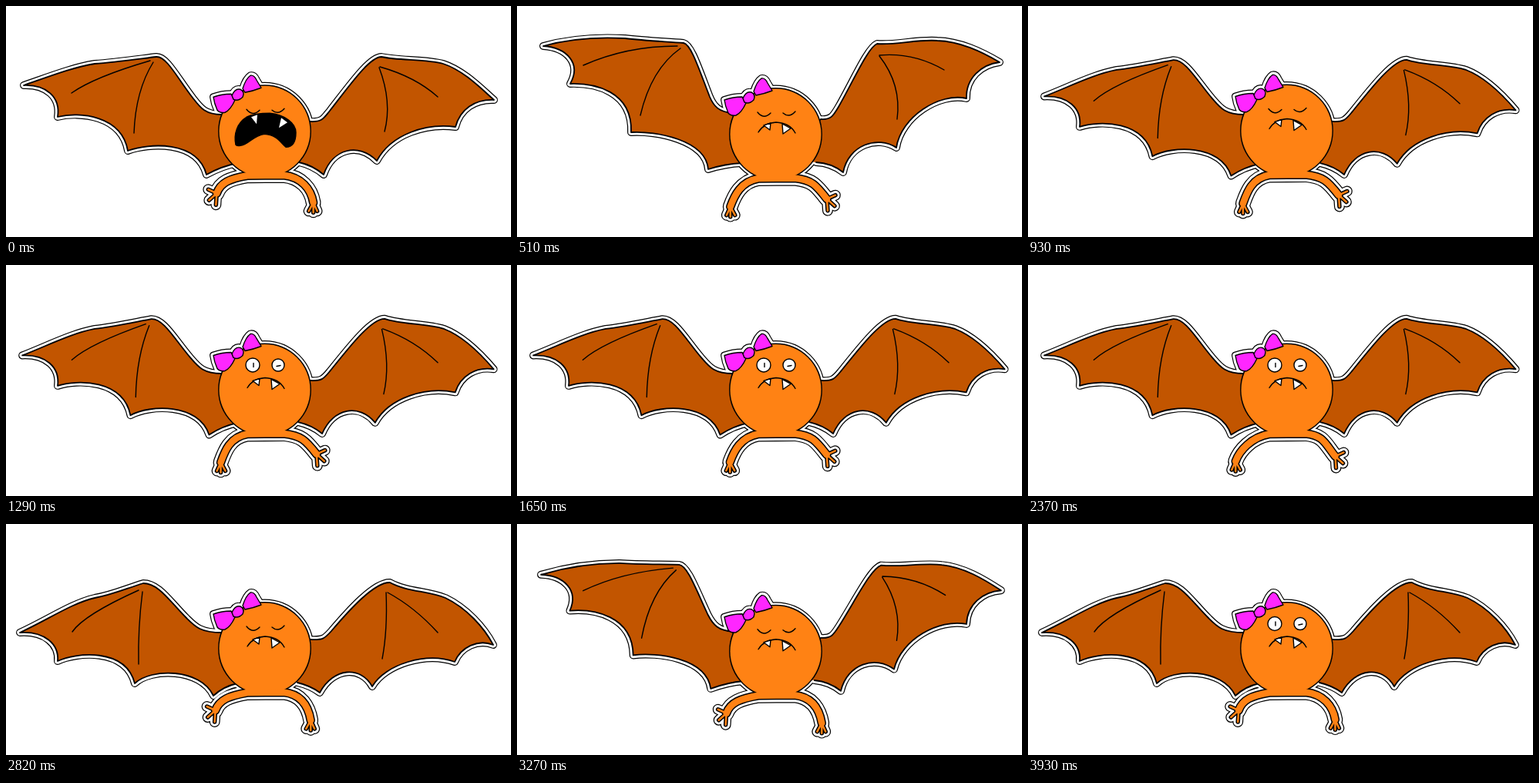
An HTML page with a canvas for the animation above (3.96 s loop, 655x300 px).

```html
<!DOCTYPE html>
<html>
<head>
<meta charset="utf-8">
<style>
html, body { margin: 0; width: 100%; height: 100%; overflow: hidden; background: #fff; }
canvas { display: block; }
</style>
</head>
<body>
<canvas width="655" height="300"></canvas>
<script>
const c = document.querySelector('canvas').getContext('2d');
c.lineJoin = c.lineCap = 'round';

const STEP = 30, STEPS = 132;
const SKIN = '#ff8214', WING = '#c25500', PINK = '#ff26ff';

// Wing height through one flap: 0 low, 1 middle, 2 high
const FLAP = [1, 1.73, 1.96, 2, 2, 2, 1.29, 0.62, 0.22, 0.05, 0, 0];

// Each part in its low, middle and high pose
const outlines = [
  [
    'M300 207L280 141C252 141 245 133 234 122C212 100 198 77 178 77C155 84 138 92 115 96C85 103 55 124 18 141C50 139 69 156 67 178C90 167 155 160 167 207C188 187 252 187 269 223Q282 211 300 207',
    'M300 204L280 141C258 141 252 132 242 119C222 93 208 65 195 66C170 69 140 73 115 75C85 80 55 92 23 103C52 102 71 118 67 144C95 137 150 142 158 188C185 178 248 174 260 219Q280 208 300 204',
    'M292 204L280 139C262 138 255 130 250 118C236 82 226 50 216 48C190 46 165 45 140 42C105 40 70 42 34 52C64 54 84 74 69 101C100 100 150 110 148 164C180 162 245 174 248 212Q270 205 292 204'
  ],
  [
    'M345 198L394 150C411 151 413 149 422 139C445 112 478 75 498 76C520 88 548 87 570 96C597 109 620 134 632 157C612 149 590 160 582 179C545 166 492 182 475 211C460 184 425 186 407 219Q395 210 378 206',
    'M345 198L394 150C410 151 412 146 420 136C448 100 472 66 487 66C510 71 545 69 567 75C592 83 614 105 633 122C608 121 589 134 583 157C545 152 500 166 481 201C457 177 424 185 412 219Q398 207 380 203',
    'M345 198L394 147C407 148 410 143 417 131C436 98 455 54 467 49C490 51 520 43 545 45C575 46 602 59 626 73C602 76 582 94 583 120C548 112 498 144 492 184C468 168 430 180 423 216Q408 204 388 203'
  ]
];
const veins = [
  [
    'M172 86Q101 118 86 140M177 88Q171 135 172 182',
    'M187 71Q115 92 85 113M191 73Q168 110 166 165',
    'M208 52Q142 52 86 77M212 55Q174 82 160 142'
  ],
  [
    'M495 89Q530 108 560 141M493 89Q495 138 488 175',
    'M485 79Q531 92 560 118M484 80Q501 125 491 163',
    'M470 64Q514 60 554 83M470 65Q499 102 493 147'
  ]
];

const bow = [
  'M269 117Q280 113 292 113L297 121Q291 134 284 137Q277 138 274 134Q270 125 269 117Z',
  'M307 106Q311 93 317 89Q322 88 325 95L331 105Q321 109 310 111Z',
  'M293 115Q297 105 304 107Q310 110 307 117Q301 123 295 120Z'
].map(d => new Path2D(d));
const head = new Path2D();
head.arc(335.5, 161.5, 59, 0, 7);

function blend(poses, v) {
  const i = v < 1 ? 0 : 1, next = poses[i + 1].match(/\d+/g);
  let n = 0;
  return new Path2D(poses[i].replace(/\d+/g, a => +a + (next[n++] - a) * (v - i)));
}

function line(p, width = 1.4, color = '#000') {
  c.lineWidth = width;
  c.strokeStyle = color;
  c.stroke(typeof p === 'string' ? new Path2D(p) : p);
}

function fill(p, color, width = 1.4) {
  const path = typeof p === 'string' ? new Path2D(p) : p;
  c.fillStyle = color;
  c.fill(path);
  if (width) line(path, width);
}

function eye(x, y, r) {
  const p = new Path2D();
  p.arc(x, y, r, 0, 7);
  fill(p, '#fff');
}

// Arms and fingers as centre lines; one hand is spread while the other hangs
function limbs(step) {
  const sway = Math.cos((step - 35) / STEPS * 2 * Math.PI);
  const rightOpen = step >= 9 && step < 94;
  const [lx, ly] = rightOpen ? [272.5 + 6.5 * sway, 255 + sway] : [273.5 + 2 * sway, 242];
  const [rx, ry] = rightOpen ? [400 + 3 * sway, 247 - 2 * sway] : [399 + 4 * sway, 254 - sway];
  const bend = rightOpen ? 14 : 3;
  const arms = new Path2D(`M${lx} ${ly}C${lx + 5} ${ly - 14} 290 223 313 219L360 218.5C383 221 ${rx - bend} ${ry - 18} ${rx} ${ry}`);
  const hang = [[-6, 11], [0, 13], [5, 11]];
  const spread = [[11, -5], [10, 9], [1, 15]];
  const fingers = new Path2D();
  const hand = (x, y, tips, side) => tips.forEach(([dx, dy]) => {
    fingers.moveTo(x, y);
    fingers.lineTo(x + dx * side, y + dy);
  });
  hand(lx, ly, rightOpen ? hang : spread, -1);
  hand(rx, ry, rightOpen ? spread : hang, 1);
  return [[arms, 11.5], [fingers, 5.5]];
}

function face(step) {
  const closed = step < 43 || (step >= 94 && step < 120);
  if (closed) {
    line('M312 133Q320 143 329 134M345 134Q353 141 361 132');
  } else {
    eye(320, 129.5, 9);
    eye(353, 129.5, 8);
    line('M321 127V132M351 131L356 130');
  }
  if (step < 8) {
    fill('M298 179C295 165 300 150 312 143Q322 138 342 138C362 140 376 151 376 163C376 176 372 182 363 182C356 176 351 166 335 165C320 167 314 180 304 180Q300 181 298 179Z', '#000');
    fill('M318 143L326 140L325 152Z', '#fff', 0);
    fill('M357 144L365 150L354 157Z', '#fff', 0);
  } else {
    line('M313 159Q320 147 336 146Q354 147 361 160');
    fill('M320 150L329 147L328 156Z', '#fff');
    fill('M344 148L355 154L345 161Z', '#fff');
  }
}

function draw(step) {
  const v = FLAP[step % 12], bob = 1.25 * v * v;
  const wings = outlines.map(o => blend(o, v));
  const tubes = limbs(step);
  const body = [[head, 1.5], ...bow.map(p => [p, 1.5]), ...tubes];
  const lowered = f => { c.save(); c.translate(0, bob); f(); c.restore(); };

  c.fillStyle = '#fff';
  c.fillRect(0, 0, 655, 300);
  // Black rim, then a white border inside it
  for (const [pad, color] of [[8.4, '#000'], [6, '#fff']]) {
    wings.forEach(w => line(w, 1.5 + pad, color));
    lowered(() => body.forEach(([p, w]) => line(p, w + pad, color)));
  }
  wings.forEach((w, i) => {
    fill(w, WING, 1.8);
    line(blend(veins[i], v));
  });
  lowered(() => {
    line(head, 2.8);
    tubes.forEach(([p, w]) => line(p, w));
    fill(head, SKIN, 0);
    tubes.forEach(([p, w]) => line(p, w - 3, SKIN));
    bow.forEach(p => fill(p, PINK));
    face(step);
  });
}

const start = performance.now();
function tick() {
  draw(Math.floor((performance.now() - start) / STEP) % STEPS);
  requestAnimationFrame(tick);
}
tick();
</script>
</body>
</html>
```
